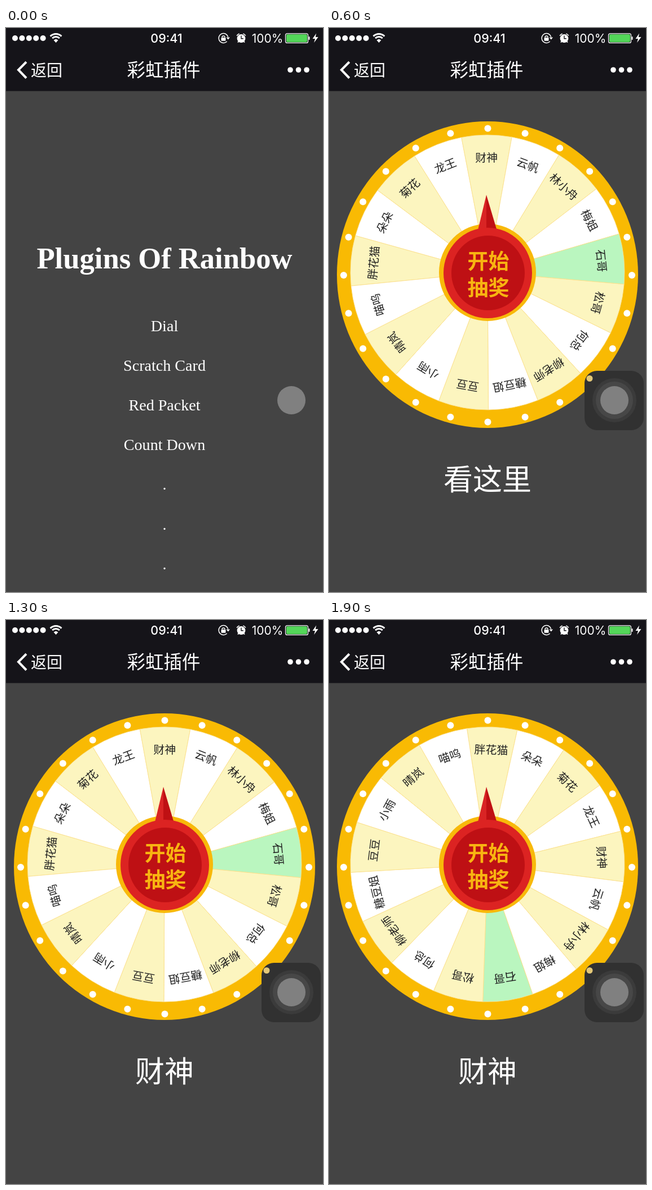
Animation of 562x997 px, one loop 2 s. Source, as an HTML page with a canvas:

```html
<!DOCTYPE html>
<html lang="zh-CN">
<head>
<meta charset="utf-8">
<title>彩虹插件</title>
<style>
  html, body { margin: 0; width: 100%; height: 100%; overflow: hidden; background: #444; }
  canvas { display: block; }
</style>
</head>
<body>
<canvas width="562" height="997"></canvas>
<script>
const ctx = document.querySelector('canvas').getContext('2d');
const CJK = '"Noto Sans CJK SC", "Noto Sans CJK", sans-serif';
const LATIN = 'Inter, sans-serif';
const SERIF = '"Liberation Serif", serif';
const LOOP = 2000, STEP = 100, TAU = Math.PI * 2;

const NAMES = ['胖花猫', '朵朵', '菊花', '龙王', '财神', '云帆', '林小舟', '梅姐', '石哥',
  '松哥', '何总', '柳老师', '糖豆姐', '豆豆', '小雨', '晴岚', '喵呜'];
const MARKED = 8;
const SLICE = TAU / NAMES.length;
const WHEEL = { x: 281, y: 432, r: 243 };

// Spin: time since start (ms) and square root of the degrees left.
const SPIN = [[0, 25.22], [200, 18.99], [500, 10.84], [700, 4.19], [835, 0]];
const REST_ANGLE = -0.5, FIRST_SPIN = 400, SECOND_SPIN = 1843, RESULT_AT = 1300;

function spun(ms) {
  if (ms <= 0) return 0;
  const total = SPIN[0][1] ** 2;
  const i = SPIN.findIndex(([t]) => t > ms);
  if (i < 0) return total;
  const [t0, a] = SPIN[i - 1], [t1, b] = SPIN[i];
  return total - (a + (b - a) * (ms - t0) / (t1 - t0)) ** 2;
}

function disc(x, y, rx, color, ry = rx) {
  ctx.fillStyle = color;
  ctx.beginPath();
  ctx.ellipse(x, y, rx, ry, 0, 0, TAU);
  ctx.fill();
}

function polygon(color, ...points) {
  ctx.fillStyle = color;
  ctx.beginPath();
  points.forEach(([x, y]) => ctx.lineTo(x, y));
  ctx.fill();
}

function polyline(color, width, ...points) {
  ctx.strokeStyle = color;
  ctx.lineWidth = width;
  ctx.beginPath();
  points.forEach(([x, y]) => ctx.lineTo(x, y));
  ctx.stroke();
}

function arc(x, y, r, from, to, width) {
  ctx.strokeStyle = '#fff';
  ctx.lineWidth = width;
  ctx.beginPath();
  ctx.arc(x, y, r, from, to);
  ctx.stroke();
}

function box(x, y, w, h, r, color) {
  ctx.fillStyle = color;
  ctx.beginPath();
  ctx.roundRect(x, y, w, h, r);
  ctx.fill();
}

function text(str, x, baseline, size, family, color = '#fff', weight = 400) {
  ctx.font = `${weight} ${size}px ${family}`;
  ctx.fillStyle = color;
  ctx.textAlign = 'center';
  ctx.fillText(str, x, baseline);
}

// Chinese text centred vertically on y.
function hanzi(str, x, y, size, color, weight) {
  text(str, x, y + size * 0.38, size, CJK, color, weight);
}

function drawStatusBar() {
  for (let i = 0; i < 5; i++) disc(16 + i * 12.4, 18, 5, '#fff');
  for (const r of [14, 9]) arc(88.5, 24.5, r, -Math.PI * 0.75, -Math.PI * 0.25, 3);
  polygon('#fff', [88.5, 26], [84.5, 21.5], [88.5, 19.5], [92.5, 21.5]);
  text('09:41', 284.5, 25.5, 21.5, LATIN, '#fff', 500);

  // Rotation lock
  arc(385.5, 18, 8.4, 0.75, TAU - 0.25, 1.5);
  polygon('#fff', [390.5, 16.5], [397, 16.5], [393.8, 20.5]);
  box(381.5, 16.8, 8, 6, 1, '#fff');
  arc(385.5, 16.5, 2.5, Math.PI, TAU, 1.4);

  // Alarm
  disc(417, 18.5, 7.4, '#fff');
  arc(417, 18.5, 9.2, -2.6, -1.95, 1.6);
  arc(417, 18.5, 9.2, -1.2, -0.55, 1.6);
  polyline('#151419', 1.4, [417, 13.5], [417, 18.8], [420.8, 18.8]);
  polyline('#fff', 1.8, [412.5, 23.5], [411, 25.5]);
  polyline('#fff', 1.8, [421.5, 23.5], [423, 25.5]);

  text('100%', 463.5, 25.5, 21, LATIN);
  ctx.strokeStyle = '#fff';
  ctx.lineWidth = 1.2;
  ctx.beginPath();
  ctx.roundRect(495.5, 9.8, 40, 16.6, 3);
  ctx.stroke();
  box(497, 11.3, 37, 13.6, 2, '#53d659');
  box(536.5, 15, 2, 6, 1, '#fff');
  polygon('#fff', [550, 9.5], [543.5, 19], [548, 19], [546, 26], [553.5, 16], [548.8, 16]);
}

function drawHeader() {
  ctx.fillStyle = '#151419';
  ctx.fillRect(0, 0, 562, 111.5);
  drawStatusBar();
  polyline('#fff', 4, [36, 60], [22, 74], [36, 88.5]);
  hanzi('返回', 72, 74.5, 28);
  hanzi('彩虹插件', 279.5, 74, 32.5, '#fff', 500);
  for (const x of [504, 518.5, 533]) disc(x, 74, 4.8, '#fff');
}

function drawMenu() {
  text('Plugins Of Rainbow', 281, 425, 52.6, SERIF, '#fff', 700);
  ['Dial', 'Scratch Card', 'Red Packet', 'Count Down', '.', '.', '.']
    .forEach((item, i) => text(item, 281, 536 + i * 70.1, 28.1, SERIF));
}

function sliceColor(i) {
  if (i === MARKED) return '#baf6bf';
  const cream = i < MARKED ? i % 2 === 0 : i % 2 === 1;
  return cream ? '#fcf5bf' : '#fff';
}

function drawWheel(degrees) {
  disc(281, 436, 267, '#f9ba03', 271);
  for (let i = 0; i < 24; i++) {
    const a = i * TAU / 24;
    disc(281.5 + 255.5 * Math.sin(a), 437 - 259.5 * Math.cos(a), 6, '#fff');
  }

  ctx.save();
  ctx.translate(WHEEL.x, WHEEL.y);
  ctx.rotate(degrees * Math.PI / 180);
  NAMES.forEach((name, i) => {
    ctx.save();
    ctx.rotate(i * SLICE);
    ctx.fillStyle = sliceColor(i);
    ctx.strokeStyle = '#fbe08c';
    ctx.lineWidth = 0.8;
    ctx.beginPath();
    ctx.moveTo(0, 0);
    ctx.arc(0, 0, WHEEL.r, -Math.PI / 2 - SLICE / 2, -Math.PI / 2 + SLICE / 2);
    ctx.closePath();
    ctx.fill();
    ctx.stroke();
    hanzi(name, -0.5, -203, 20, '#222', 500);
    ctx.restore();
  });
  ctx.restore();
}

function drawHub() {
  disc(281, 432, 86, '#f8b90a');
  polygon('#d92424', [279, 295], [264, 357], [280, 362]);
  polygon('#bf1013', [279, 295], [279, 362], [297.5, 357]);
  disc(281.5, 433, 78.5, '#dc2322', 80);
  disc(282, 433, 65, '#be1014', 66);
  hanzi('开始', 282.5, 412, 37, '#f8b411', 700);
  hanzi('抽奖', 282.5, 459, 37, '#f8b411', 700);
}

function drawTouchButton(active) {
  if (active) {
    box(453, 606, 105, 105, 22, '#313131');
    disc(462, 619.5, 5.5, '#e3c777');
    disc(506, 658, 39, '#3b3b3b');
    disc(506, 658, 33, '#474747');
  }
  disc(506, 658, 25, '#808080');
}

function draw(t) {
  ctx.fillStyle = '#444';
  ctx.fillRect(0, 0, 562, 997);
  drawHeader();
  const onMenu = t < STEP;
  if (onMenu) {
    drawMenu();
  } else {
    drawWheel(REST_ANGLE + spun(t - FIRST_SPIN) + spun(t - SECOND_SPIN));
    drawHub();
    hanzi(t < RESULT_AT ? '看这里' : '财神', 281, 797, 52);
  }
  drawTouchButton(!onMenu);
}

function tick() {
  const t = performance.now() % LOOP;
  draw(Math.floor(t / STEP) * STEP);
  requestAnimationFrame(tick);
}
tick();
</script>
</body>
</html>
```
